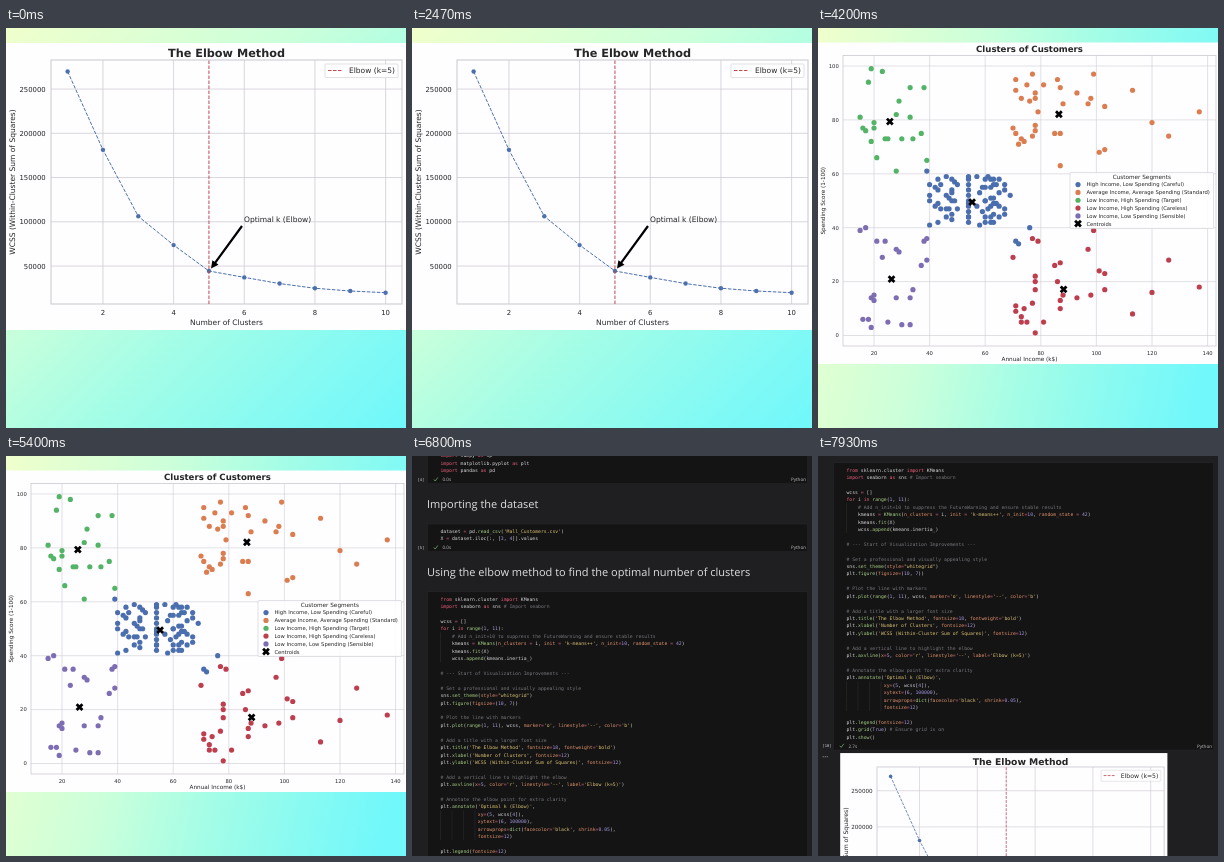
Animation of 400x400 px, one loop 8000 ms. Source, as an HTML page:

```html
<!DOCTYPE html>
<html lang="en">
<head>
<meta charset="utf-8">
<title>K-Means Clustering</title>
<style>
  html, body { margin: 0; width: 100%; height: 100%; overflow: hidden; background: #1f1f21; }
  svg { display: block; width: 100vw; height: 100vh; }
  text { font-family: "DejaVu Sans", sans-serif; fill: #262626; text-rendering: geometricPrecision; white-space: pre; }
  .bold { font-weight: bold; }
  .head { font-family: "Open Sans", "Noto Sans", sans-serif; fill: #dededf; }
  .code { font-family: "DejaVu Sans Mono", monospace; fill: #d6d4d6; }
  .ui { font-family: "Open Sans", sans-serif; fill: #c4c4c6; }
</style>
</head>
<body>
<svg id="stage" viewBox="0 0 400 400" preserveAspectRatio="none"></svg>
<script>
const LOOP = 8000, CLUSTERS_AT = 3270, NOTEBOOK_AT = 5770;

const attrs = o => Object.entries(o).map(([k, v]) => ` ${k}="${v}"`).join('');
const el = (tag, o, body = '') => `<${tag}${attrs(o)}>${body}</${tag}>`;
const rect = (x, y, width, height, fill, o = {}) => el('rect', { x, y, width, height, fill, ...o });
const line = (x1, y1, x2, y2, stroke, width, o = {}) =>
  el('line', { x1, y1, x2, y2, stroke, 'stroke-width': width, ...o });
const dot = (cx, cy, r, fill) => el('circle', { cx, cy, r, fill });
const text = (x, y, size, str, o = {}) => el('text', { x, y, 'font-size': size, ...o }, str);
const mid = { 'text-anchor': 'middle' }, end = { 'text-anchor': 'end' };

const GRID = '#cfcdd4', PAPER = '#fefdff', BLUE = '#4c70ae', RED = '#c04c50';

// Grid, tick labels, frame, title and axis labels shared by both charts
function axes(c) {
  const { l, t, r, b, px, py } = c;
  let s = '';
  for (const v of c.xTicks) {
    s += line(px(v), t, px(v), b, GRID, c.grid) + text(px(v), c.xTickY, c.tick, v, mid);
  }
  for (const v of c.yTicks) {
    s += line(l, py(v), r, py(v), GRID, c.grid) + text(l - c.gap, py(v) + c.tick * .36, c.tick, v, end);
  }
  return s + rect(l, t, r - l, b - t, 'none', { stroke: '#c9c7ce', 'stroke-width': c.grid * 1.25 })
    + text((l + r) / 2, c.titleY, c.title * 1.5, c.name, { ...mid, class: 'bold' })
    + text((l + r) / 2, c.xLabelY, c.title, c.xLabel, mid)
    + text(0, 0, c.title, c.yLabel, { ...mid, transform: `translate(${c.yLabelX} ${(t + b) / 2}) rotate(-90)` });
}

function elbowChart() {
  const px = k => 26.3 + 35.33 * k, py = v => 282.3 - v * .000885;
  const wcss = [269800, 181300, 106200, 73700, 44400, 37200, 30200, 24900, 21800, 19900];
  const pts = wcss.map((v, i) => [px(i + 1), py(v)]);
  return rect(0, 15, 400, 287, PAPER)
    + axes({
        l: 45, t: 32, r: 396, b: 276, px, py, grid: .8, tick: 6.88, gap: 5.3, title: 7.52,
        xTicks: [2, 4, 6, 8, 10], yTicks: [50000, 100000, 150000, 200000, 250000],
        xTickY: 287.2, titleY: 29, xLabelY: 296.6, yLabelX: 9,
        name: 'The Elbow Method', xLabel: 'Number of Clusters',
        yLabel: 'WCSS (Within-Cluster Sum of Squares)'
      })
    + el('polyline', { points: pts.join(' '), fill: 'none', stroke: BLUE, 'stroke-width': 1, 'stroke-dasharray': '3.5 1.5' })
    + pts.map(([x, y]) => dot(x, y, 2.2, BLUE)).join('')
    + line(px(5), 276, px(5), 32, RED, 1, { 'stroke-dasharray': '3.5 1.5' })
    + el('path', { d: 'M0 0L7.5 -3.75V-1.1H52.6V1.1H7.5V3.75Z', transform: 'translate(205 240.5) rotate(-53.9)' })
    + text(238, 194, 7.52, 'Optimal k (Elbow)')
    + rect(319, 36, 73, 13.5, '#fff', { rx: 1, stroke: GRID, 'stroke-width': .6, 'fill-opacity': .85 })
    + line(322, 42.5, 337, 42.5, RED, 1, { 'stroke-dasharray': '3.5 1.5' })
    + text(343, 45.2, 7.52, 'Elbow (k=5)');
}

// Rows of income, low score, high score
const lowIncome = [
  15, 39, 81, 16, 6, 77, 17, 40, 76, 18, 6, 94, 19, 3, 72, 19, 14, 99, 20, 15, 77, 20, 13, 79,
  21, 35, 66, 23, 29, 98, 24, 35, 73, 25, 5, 73, 28, 14, 82, 28, 32, 61, 29, 31, 87, 30, 4, 73,
  33, 4, 92, 33, 14, 81, 34, 17, 73, 37, 26, 75, 38, 35, 92, 39, 36, 61, 39, 28, 65];
const highIncome = [
  70, 29, 77, 71, 35, 95, 71, 11, 75, 71, 9, 91, 72, 34, 71, 73, 5, 88, 73, 7, 73, 74, 10, 72,
  75, 5, 93, 76, 40, 87, 77, 12, 97, 77, 36, 74, 78, 22, 90, 78, 17, 88, 78, 20, 76, 78, 1, 78,
  79, 35, 83, 81, 5, 93, 85, 26, 75, 86, 20, 95, 87, 27, 63, 87, 13, 75, 87, 10, 92, 88, 15, 86,
  93, 14, 90, 97, 32, 86, 98, 15, 88, 99, 39, 97, 101, 24, 68, 103, 17, 85, 103, 23, 69,
  113, 8, 91, 120, 16, 79, 126, 28, 74, 137, 18, 83];
// How many customers share each middle income
const middle = { 40: 4, 42: 2, 43: 4, 44: 2, 46: 4, 47: 2, 48: 6, 49: 2, 50: 2, 54: 12, 57: 2,
  58: 2, 59: 2, 60: 6, 61: 2, 62: 6, 63: 6, 64: 2, 65: 4, 67: 4, 69: 1 };

const groups = [
  { name: 'High Income, Low Spending (Careful)', color: '#4a6eae', c: [55.3, 49.5] },
  { name: 'Average Income, Average Spending (Standard)', color: '#dc7d4f', c: [86.5, 82.1] },
  { name: 'Low Income, High Spending (Target)', color: '#54b466', c: [25.7, 79.4] },
  { name: 'Low Income, High Spending (Careless)', color: '#bd3f4d', c: [88.2, 17.1] },
  { name: 'Low Income, Low Spending (Sensible)', color: '#7d6db3', c: [26.3, 20.9] }
];

function customers() {
  const out = [];
  for (const rows of [lowIncome, highIncome]) {
    for (let i = 0; i < rows.length; i += 3) out.push([rows[i], rows[i + 1]], [rows[i], rows[i + 2]]);
  }
  let seed = 7;
  for (const [income, n] of Object.entries(middle)) {
    // Spread each column over the score range with a little jitter
    for (let i = 0; i < n; i++) {
      seed = seed * 16807 % 2147483647;
      out.push([+income, Math.round(40.5 + (i + seed / 2147483647) * 19.5 / n)]);
    }
  }
  return out;
}

function clusterChart() {
  const px = v => .4 + 2.78 * v, py = v => 307.5 - 2.695 * v;
  const dist = ([x, y], [a, b]) => (x - a) ** 2 + (y - b) ** 2;
  const nearest = p => groups.reduce((a, g) => dist(p, g.c) < dist(p, a.c) ? g : a);
  const cross = (x, y) => el('path', {
    d: `M${x - 2.9} ${y - 2.9}l5.8 5.8m0 -5.8l-5.8 5.8`, stroke: '#000', 'stroke-width': 2.8
  });
  const rowY = i => 156.6 + 7.82 * i;
  return rect(0, 14.5, 400, 321.5, PAPER)
    + axes({
        l: 25, t: 27.5, r: 398, b: 318, px, py, grid: .6, tick: 5.25, gap: 4.2, title: 5.73,
        xTicks: [20, 40, 60, 80, 100, 120, 140], yTicks: [0, 20, 40, 60, 80, 100],
        xTickY: 326.5, titleY: 24, xLabelY: 333.4, yLabelX: 7,
        name: 'Clusters of Customers', xLabel: 'Annual Income (k$)', yLabel: 'Spending Score (1-100)'
      })
    + customers().map(p => dot(px(p[0]), py(p[1]), 2.6, nearest(p).color)).join('')
    + groups.map(g => cross(px(g.c[0]), py(g.c[1]))).join('')
    + rect(252, 144.5, 143.5, 56, '#fff', { rx: 1, stroke: GRID, 'stroke-width': .6, 'fill-opacity': .85 })
    + text(323.8, 150.8, 5.73, 'Customer Segments', mid)
    + groups.map((g, i) => dot(260, rowY(i), 2.6, g.color) + text(268.4, rowY(i) + 1.8, 5.25, g.name)).join('')
    + cross(260, rowY(5)) + text(268.4, rowY(5) + 1.8, 5.25, 'Centroids');
}

const cells = [
  { top: 67, id: 4, time: '0.0s', src: `import numpy as np
import matplotlib.pyplot as plt
import pandas as pd` },
  { top: 142.4, id: 5, time: '0.0s', src: `dataset = pd.read_csv('Mall_Customers.csv')
X = dataset.iloc[:, [3, 4]].values` },
  { top: 210.2, id: 10, time: '2.7s', src: `from sklearn.cluster import KMeans
import seaborn as sns # Import seaborn

wcss = []
for i in range(1, 11):
    # Add n_init=10 to suppress the FutureWarning and ensure stable results
    kmeans = KMeans(n_clusters = i, init = 'k-means++', n_init=10, random_state = 42)
    kmeans.fit(X)
    wcss.append(kmeans.inertia_)

# --- Start of Visualization Improvements ---

# Set a professional and visually appealing style
sns.set_theme(style="whitegrid")
plt.figure(figsize=(10, 7))

# Plot the line with markers
plt.plot(range(1, 11), wcss, marker='o', linestyle='--', color='b')

# Add a title with a larger font size
plt.title('The Elbow Method', fontsize=18, fontweight='bold')
plt.xlabel('Number of Clusters', fontsize=12)
plt.ylabel('WCSS (Within-Cluster Sum of Squares)', fontsize=12)

# Add a vertical line to highlight the elbow
plt.axvline(x=5, color='r', linestyle='--', label='Elbow (k=5)')

# Annotate the elbow point for extra clarity
plt.annotate('Optimal k (Elbow)',
             xy=(5, wcss[4]),
             xytext=(6, 100000),
             arrowprops=dict(facecolor='black', shrink=0.05),
             fontsize=12)

plt.legend(fontsize=12)
plt.grid(True) # Ensure grid is on
plt.show()` }
];

const tokens = new RegExp([
  '(?<comment>#.*)', '(?<string>\'[^\']*\'|"[^"]*")', '(?<keyword>\\b(?:import|from|as|for|in)\\b)',
  '(?<param>(?<=[(,]\\s?|\\s{9})\\w+(?=\\s?=))', '(?<call>\\w+(?=\\())',
  '(?<number>\\b(?:\\d[\\d.]*|True)\\b)', '(?<op>=)'
].join('|'), 'g');
const ink = { comment: '#77757a', string: '#dcc272', keyword: '#ea5f7c', param: '#e2936a',
  call: '#a5cc80', number: '#a597e0', op: '#dc6480' };

const paint = src => src.replace(tokens, (m, ...rest) => {
  const kind = Object.entries(rest.at(-1)).find(([, v]) => v !== undefined)[0];
  return el('tspan', { fill: ink[kind] }, m);
});

function cell({ top, id, time, src }) {
  const LH = 7.42, CW = 2.87, X = 28.5, lines = src.split('\n');
  const foot = top + lines.length * LH + 8.6;
  let s = rect(15.5, top, 380, foot + 4.2 - top, '#141415', { stroke: '#29292c', 'stroke-width': .5 });
  lines.forEach((row, i) => {
    const y = top + 7.2 + i * LH, indent = row.search(/\S/);
    for (let c = 0; c < indent; c += 4) {
      s += line(X + c * CW, y - LH / 2, X + c * CW, y + LH / 2, '#303033', .5);
    }
    if (row) s += text(X, y + 1.7, 4.77, paint(row), { class: 'code' });
  });
  return s
    + text(9, foot + 1.5, 3.8, `[${id}]`, { ...mid, class: 'code' })
    + el('path', { d: `M21.8 ${foot}l1.4 1.6l2.6 -3.6`, fill: 'none', stroke: '#7dbb78', 'stroke-width': .7 })
    + text(30.5, foot + 1.7, 4.6, time, { class: 'ui' })
    + text(394, foot + 1.7, 4.6, 'Python', { ...end, class: 'ui' });
}

function notebook() {
  const head = (y, size, str) => text(15, y, size, str, { class: 'head' });
  return rect(0, 0, 400, 900, '#1f1f21')
    + head(22.6, 12.75, 'K-Means Clustering')
    + head(51, 11, 'Importing the libraries')
    + head(126.6, 11, 'Importing the dataset')
    + head(194.8, 11, 'Using the elbow method to find the optimal number of clusters')
    + cells.map(cell).join('')
    + [5.2, 7.2, 9.2].map(x => dot(x, 504.3, .55, '#b8b8ba')).join('')
    + el('g', { transform: 'translate(22.2 488.3) scale(.818)' }, elbowChart());
}

const gradient = (id, x2, y2) => el('linearGradient', { id, gradientUnits: 'userSpaceOnUse', x1: 0, y1: 0, x2, y2 },
  [[0, '#f0ffcc'], [.38, '#c9ffdb'], [.6, '#a4fde6'], [.88, '#7ef9f6'], [1, '#70f8fb']]
    .map(([offset, color]) => el('stop', { offset, 'stop-color': color })).join(''));

const stage = document.getElementById('stage');
stage.innerHTML = el('defs', {}, gradient('diagonal', 400, 400) + gradient('sideways', 445, 95))
  + el('g', { id: 'elbow' }, rect(0, 0, 400, 400, 'url(#diagonal)') + elbowChart())
  + el('g', { id: 'clusters' }, rect(0, 0, 400, 400, 'url(#sideways)') + clusterChart())
  + el('g', { id: 'notebook' }, notebook());
const scenes = ['elbow', 'clusters', 'notebook'].map(id => document.getElementById(id));

// Time, scroll offset, speed
const scrollKeys = [[6300, 0, 0], [6800, 74.3, .1], [7600, 129.5, .11], [7930, 203.5, .25]];

function scrollAt(t) {
  if (t <= scrollKeys[0][0]) return 0;
  const i = scrollKeys.findIndex(k => t < k[0]);
  if (i < 0) return scrollKeys.at(-1)[1];
  const [t0, y0, v0] = scrollKeys[i - 1], [t1, y1, v1] = scrollKeys[i];
  const d = t1 - t0, u = (t - t0) / d, w = 1 - u;
  return w * w * ((1 + 2 * u) * y0 + u * d * v0) + u * u * ((3 - 2 * u) * y1 - w * d * v1);
}

function render(t) {
  const now = t < CLUSTERS_AT ? 0 : t < NOTEBOOK_AT ? 1 : 2;
  scenes.forEach((s, i) => s.setAttribute('display', i === now ? 'inline' : 'none'));
  scenes[2].setAttribute('transform', `translate(0 ${-scrollAt(t)})`);
}

function tick() {
  render(performance.now() % LOOP);
  requestAnimationFrame(tick);
}
tick();
</script>
</body>
</html>
```
